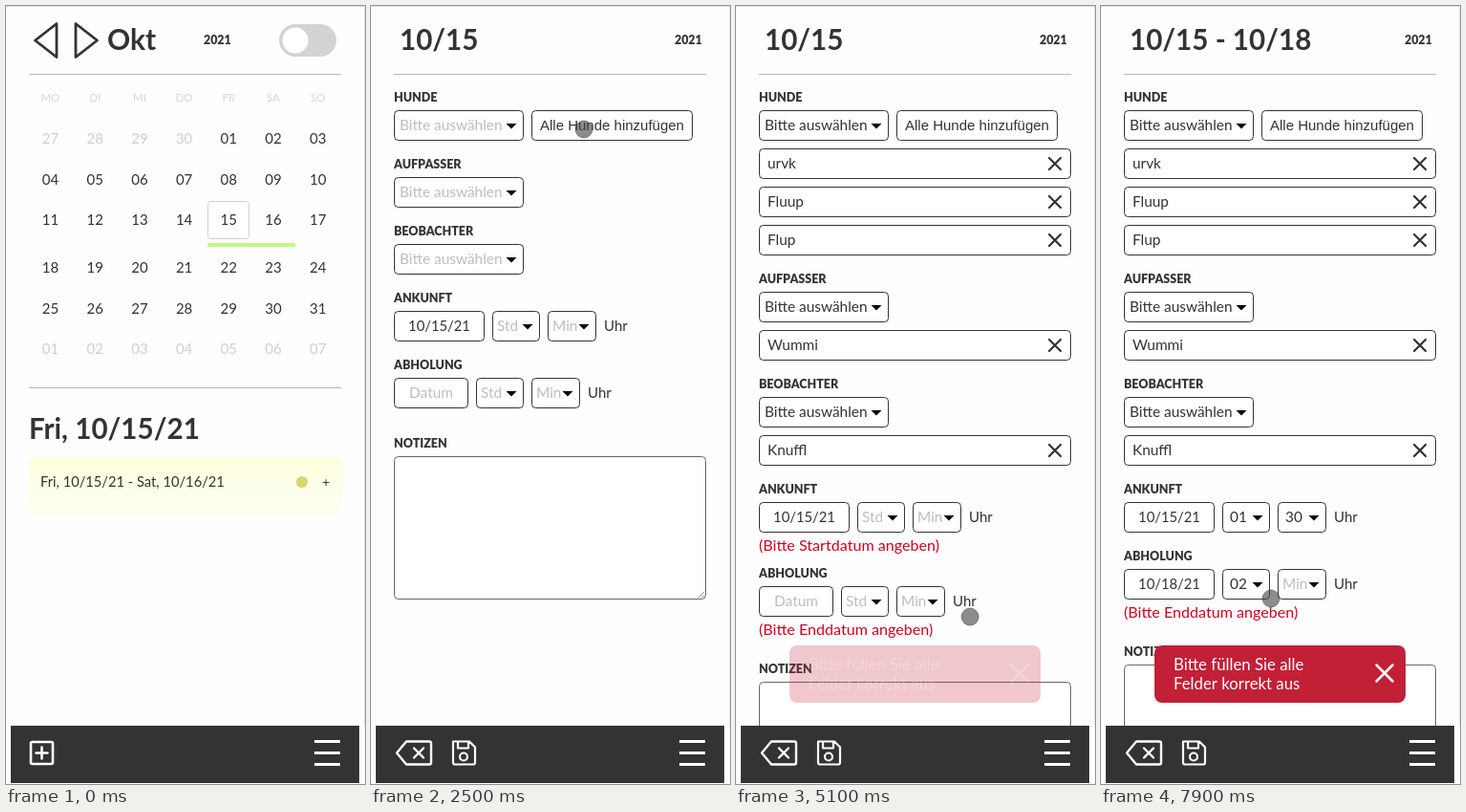
An HTML page with a canvas for the animation above (8 s loop, 376 by 814 pixels).

```html
<!DOCTYPE html>
<html lang="de">
<head>
<meta charset="utf-8">
<title>Terminplaner</title>
<style>
html, body { margin: 0; width: 100%; height: 100%; overflow: hidden; background: #fefefe; }
canvas { display: block; }
</style>
</head>
<body>
<canvas id="stage" width="376" height="814"></canvas>
<script>
const c = document.getElementById('stage').getContext('2d');
const LOOP = 8000, INK = '#333', PALE = '#bdbdbd', RED = '#d00020';
const LATO = 'Lato, "Open Sans", sans-serif';
const ARIAL = '"Liberation Sans", Arial, sans-serif';
const TAP = 'rgba(51,181,229,.4)';

// Moments at which the state changes, in ms
const T = {
  menuOpen: 650, tapTermine: 1330, menuClose: 1500, form: 2000,
  dogs: 2600, sitter: 3200, watcher: 3900, save: 4400, dismiss: 4950,
  hour: 5620, minute: 6150, saveAgain: 6380, picker: 6620, date: 7020, hour2: 7620
};

// Pointer stops: time, x, y
const path = [
  [300, 310, 650], [600, 337, 782], [800, 337, 782], [1200, 308, 708], [1500, 308, 708],
  [1850, 38, 782], [2020, 38, 782], [2450, 223, 129], [2650, 223, 129],
  [2900, 100, 315], [3000, 100, 315], [3200, 92, 350], [3550, 100, 425], [3700, 100, 425],
  [3900, 92, 460], [4300, 97, 781], [4550, 97, 781], [4850, 297, 697], [5000, 297, 697],
  [5250, 152, 535], [5400, 152, 535], [5650, 152, 629], [5720, 152, 629],
  [5950, 210, 535], [6150, 210, 560], [6340, 97, 781], [6420, 97, 781],
  [6620, 72, 605], [6760, 72, 605], [6980, 77, 793], [7060, 77, 793],
  [7280, 152, 605], [7400, 152, 605], [7620, 152, 650], [7880, 178, 620], [8000, 178, 620]
];

const ramp = (t, a, b) => Math.max(0, Math.min(1, (t - a) / (b - a)));
const ease = u => u * u * (3 - 2 * u);
const two = n => String(n).padStart(2, '0');

function text(s, x, y, size, { color = INK, weight = 400, align = 'left', font = LATO } = {}) {
  c.font = `${weight} ${size}px ${font}`;
  c.textAlign = align;
  c.fillStyle = color;
  c.fillText(s, x, y + size * 0.355);
}

function fill(x, y, w, h, color, r = 0) {
  c.fillStyle = color;
  c.beginPath();
  c.roundRect(x, y, w, h, r);
  c.fill();
}

function box(x, y, w, h, r = 4, color = INK, bg = '#fff') {
  fill(x, y, w, h, bg, r);
  c.strokeStyle = color;
  c.lineWidth = 1;
  c.beginPath();
  c.roundRect(x + .5, y + .5, w - 1, h - 1, r);
  c.stroke();
}

// Strokes SVG path data shifted to x, y
function draw(d, x, y, color, width) {
  c.save();
  c.translate(x, y);
  c.strokeStyle = color;
  c.lineWidth = width;
  c.lineJoin = c.lineCap = 'round';
  c.stroke(new Path2D(d));
  c.restore();
}

function disc(x, y, r, color) {
  c.fillStyle = color;
  c.beginPath();
  c.arc(x, y, r, 0, 7);
  c.fill();
}

const cross = (x, y, r, color, w) => draw(`M${-r} ${-r}L${r} ${r}M${r} ${-r}L${-r} ${r}`, x, y, color, w);
const rule = y => fill(24, y, 327, 1, '#b5b5b5');

function calendar() {
  draw('M30.500 36L53 18.500V53.500Z', 0, 0, INK, 2.8);
  draw('M73 18.500V53.500L95.500 36Z', 0, 0, INK, 2.8);
  text('Okt', 106, 35, 30, { weight: 700 });
  text('2021', 207, 36, 12.4, { weight: 900 });
  fill(286, 19, 60, 34, '#d3d3d3', 17);
  disc(303, 36, 13.5, '#fff');
  rule(71);
  rule(399);
  box(211, 204, 44, 40, 3, '#d0d0d0');
  fill(211, 248, 92, 4, '#c3f981');
  const col = i => 46.5 + i * 46.7;
  ['MO', 'DI', 'MI', 'DO', 'FR', 'SA', 'SO'].forEach((d, i) =>
    text(d, col(i), 96, 11.5, { color: '#d6d6d6', align: 'center' }));
  [139, 182, 224, 274, 317, 359].forEach((y, row) => {
    for (let i = 0; i < 7; i++) {
      const n = row * 7 + i - 3;
      const out = n < 1 || n > 31;
      const day = n < 1 ? n + 30 : n > 31 ? n - 31 : n;
      text(two(day), col(i), y, 15, { color: out ? '#cfcfcf' : INK, align: 'center' });
    }
  });
  text('Fri, 10/15/21', 24, 442, 29.6, { weight: 700 });
  const glow = c.createLinearGradient(0, 472, 0, 532);
  glow.addColorStop(0, '#fdffdc');
  glow.addColorStop(1, '#fefff4');
  fill(24, 472, 328, 60, glow, 5);
  text('Fri, 10/15/21 - Sat, 10/16/21', 36, 498, 14.7);
  disc(310, 498, 6, '#d9d768');
  text('+', 335, 498, 14, { align: 'center' });
}

const icons = [
  ['Logout', 'M1 -8H-7V8H1M-2 0H9M5 -4L9 0L5 4'],
  ['Profil', 'M4 -4A4 5 0 1 1 -4 -4A4 5 0 1 1 4 -4M-8 8C-8 0 8 0 8 8Z'],
  ['Kontakte', 'M-7 -9H8V9H-7ZM-7 5H8M-2 1H4M1 -5V-2'],
  ['Hunde', 'M-9 6C-11 -5 -4 -7 2 -6C8 -6 11 -1 8 4H3L0 0M-4 -5V3L-7 7'],
  ['Termine', 'M-8 -6H8V9H-8ZM-8 -4H8M-4 -9V-6M4 -9V-6']
];

function menu(t, open) {
  if (!open) return;
  c.save();
  c.beginPath();
  c.rect(0, 0, 376, 753);
  c.clip();
  c.translate(0, (1 - open) * 300);
  fill(5, 452, 365, 301, '#fff', [10, 10, 0, 0]);
  fill(5, 456, 365, 293, '#3e3e3e', [8, 8, 0, 0]);
  icons.forEach(([name, d], i) => {
    const y = 503 + i * 50, color = i === 4 ? '#eee' : '#a2a2a2';
    text(name, 316, y, 24.3, { weight: 900, align: 'right', color });
    draw(d, 335, y, color, 1.7);
  });
  if (t >= T.tapTermine && t < T.menuClose) fill(225, 683, 120, 40, TAP);
  c.restore();
}

function footer(t, open) {
  fill(0, 753, 376, 61, '#fefefe');
  fill(5, 753, 365, 60, INK);
  if (t < T.form) {
    draw('M-10 -11.500H10Q11.500 -11.500 11.500 -10V10Q11.500 11.500 10 11.500H-10Q-11.500 11.500 -11.500 10V-10Q-11.500 -11.500 -10 -11.500ZM-6 0H6M0 -6V6', 37.5, 781.5, '#fff', 2.6);
  } else {
    draw('M-18 0L-8 -12H16Q18 -12 18 -10V10Q18 12 16 12H-8ZM0 -5L10 5M10 -5L0 5', 45, 781.5, '#fff', 2.4);
    draw('M-11 -12H6L12 -6V10Q12 12 10 12H-9Q-11 12 -11 10ZM-6 -12V-5H5V-12M4 4A4 4 0 1 1 -4 4A4 4 0 1 1 4 4', 97, 781.5, '#fff', 2.2);
    const tapped = (t >= T.save - 50 && t < T.save + 150) || (t >= T.saveAgain - 40 && t < T.saveAgain + 60);
    if (tapped) fill(84, 768, 27, 28, TAP);
  }
  c.save();
  c.translate(336.5 + open * 1.5, 781.5);
  c.rotate(open * Math.PI / 2);
  for (const y of [-12, 0, 12]) fill(-13.5, y - 1.5, 27, 3, '#fff');
  c.restore();
}

const label = (s, y) => text(s, 24, y, 12.5, { weight: 900 });

function select(s, x, y, w, dark, pad = 6) {
  box(x, y, w, 32);
  text(s, x + pad, y + 16, 15.4, { color: dark ? INK : PALE });
  const ax = x + w - 13, ay = y + 14;
  c.fillStyle = '#000';
  c.beginPath();
  c.moveTo(ax - 5.5, ay);
  c.lineTo(ax + 5.5, ay);
  c.lineTo(ax, ay + 5.5);
  c.fill();
}

function group(title, y, names, dark) {
  label(title, y);
  select('Bitte auswählen', 24, y + 13, 136, dark);
  names.forEach((name, i) => {
    const top = y + 53 + i * 40;
    box(24, top, 327, 32);
    text(name, 33, top + 16, 15.4);
    cross(334, top + 16, 6, INK, 2.2);
  });
  return y + 70 + names.length * 40;
}

function when(title, y, date, hour, minute, error) {
  const w = date ? 95 : 78, x = 24 + w + 8, top = y + 13;
  label(title, y);
  box(24, top, w, 32);
  text(date || 'Datum', 24 + w / 2, top + 16, date ? 14.8 : 15.4, { align: 'center', color: date ? INK : PALE });
  select(hour || 'Std', x, top, 50, hour, hour ? 8 : 5);
  select(minute || 'Min', x + 58, top, 51, minute, minute ? 8 : 5);
  text('Uhr', x + 117, top + 16, 15);
  if (error) text(error, 24, y + 58, 16.1, { color: RED });
  return y + 70 + (error ? 18 : 0);
}

function form(t) {
  const after = m => t >= T[m];
  text(after('date') ? '10/15 - 10/18' : '10/15', 30, 35, 29.6, { weight: 700 });
  text('2021', 318, 36, 12.4, { weight: 900 });
  rule(71);
  const dark = after('dogs');
  box(168, 109, 169, 32);
  text('Alle Hunde hinzufügen', 177, 125, 15, { font: ARIAL });
  let y = group('HUNDE', 96, dark ? ['urvk', 'Fluup', 'Flup'] : [], dark);
  y = group('AUFPASSER', y, after('sitter') ? ['Wummi'] : [], dark);
  y = group('BEOBACHTER', y, after('watcher') ? ['Knuffl'] : [], dark);
  y = when('ANKUNFT', y, '10/15/21', after('hour') && '01', after('minute') && '30',
    after('save') && !after('minute') && '(Bitte Startdatum angeben)');
  const dateTop = y + 13;
  y = when('ABHOLUNG', y, after('date') && '10/18/21', after('hour2') && '02', '',
    after('save') && '(Bitte Enddatum angeben)');
  if (after('picker') && !after('date')) box(24, dateTop, 78, 32, 4, INK, '#add8e6');
  y += 12;
  label('NOTIZEN', y);
  box(24, y + 13, 327, 150, 4, '#666');
  draw('M-6 0L0 -6M-2 0L0 -2', 349, y + 161, '#777', .8);
}

function toast(t) {
  const alpha = t < T.saveAgain
    ? ramp(t, T.save + 20, T.save + 450) * (1 - ramp(t, T.dismiss, T.dismiss + 200))
    : ramp(t, T.saveAgain, T.saveAgain + 250);
  c.globalAlpha = alpha;
  fill(56, 669, 263, 60, '#c22036', 8);
  text('Bitte füllen Sie alle', 76, 689, 16.8, { color: '#fff' });
  text('Felder korrekt aus', 76, 709, 16.8, { color: '#fff' });
  cross(297, 698, 8.5, '#fff', 2.5);
  c.globalAlpha = 1;
}

function picker() {
  c.save();
  c.shadowColor = 'rgba(0,0,0,.35)';
  c.shadowBlur = 6;
  fill(24, 622, 218, 200, '#fff');
  c.restore();
  text('October 2021', 35, 644, 12, { weight: 700, font: ARIAL, color: '#111' });
  c.fillStyle = '#111';
  c.fill(new Path2D('M115 642H122L118.500 646Z'));
  draw('M0 8V-8M-7 -1L0 -8L7 -1', 185, 645, '#444', 1.4);
  draw('M0 -8V8M-7 1L0 8L7 1', 217, 645, '#444', 1.4);
  fill(175, 751, 28, 29, '#8a7350');
  fill(177, 753, 24, 25, '#1673e6');
  for (let i = 0; i < 7; i++) {
    const x = 49 + i * 28;
    const cell = (s, y, color) => text(s, x, y, 12, { font: ARIAL, align: 'center', color });
    cell('SMTWTFS'[i], 681, '#222');
    for (let row = 0; row < 4; row++) {
      const n = row * 7 + i - 4;
      cell(n < 1 ? n + 30 : n, 709.5 + row * 28, n < 1 ? '#999' : n === 15 ? '#fff' : '#222');
    }
  }
}

function pointer(t) {
  const i = path.findIndex(p => p[0] > t);
  if (i < 1) return;
  const [t0, x0, y0] = path[i - 1], [t1, x1, y1] = path[i];
  const u = ease(ramp(t, t0, t1));
  disc(x0 + (x1 - x0) * u, y0 + (y1 - y0) * u, 9, 'rgba(70,70,70,.62)');
  c.strokeStyle = 'rgba(60,60,60,.5)';
  c.lineWidth = 1;
  c.stroke();
}

function frame(now) {
  const t = now % LOOP;
  const open = ease(ramp(t, T.menuOpen, T.menuOpen + 300)) - ease(ramp(t, T.menuClose, T.menuClose + 300));
  fill(0, 0, 376, 814, '#fefefe');
  if (t < T.form) calendar();
  else form(t);
  fill(0, 0, 376, 1, '#e2e2e2');
  fill(375, 0, 1, 814, '#e8e8e8');
  menu(t, open);
  footer(t, open);
  toast(t);
  if (t >= T.picker && t < T.date) picker();
  pointer(t);
  requestAnimationFrame(frame);
}
requestAnimationFrame(frame);
</script>
</body>
</html>
```
